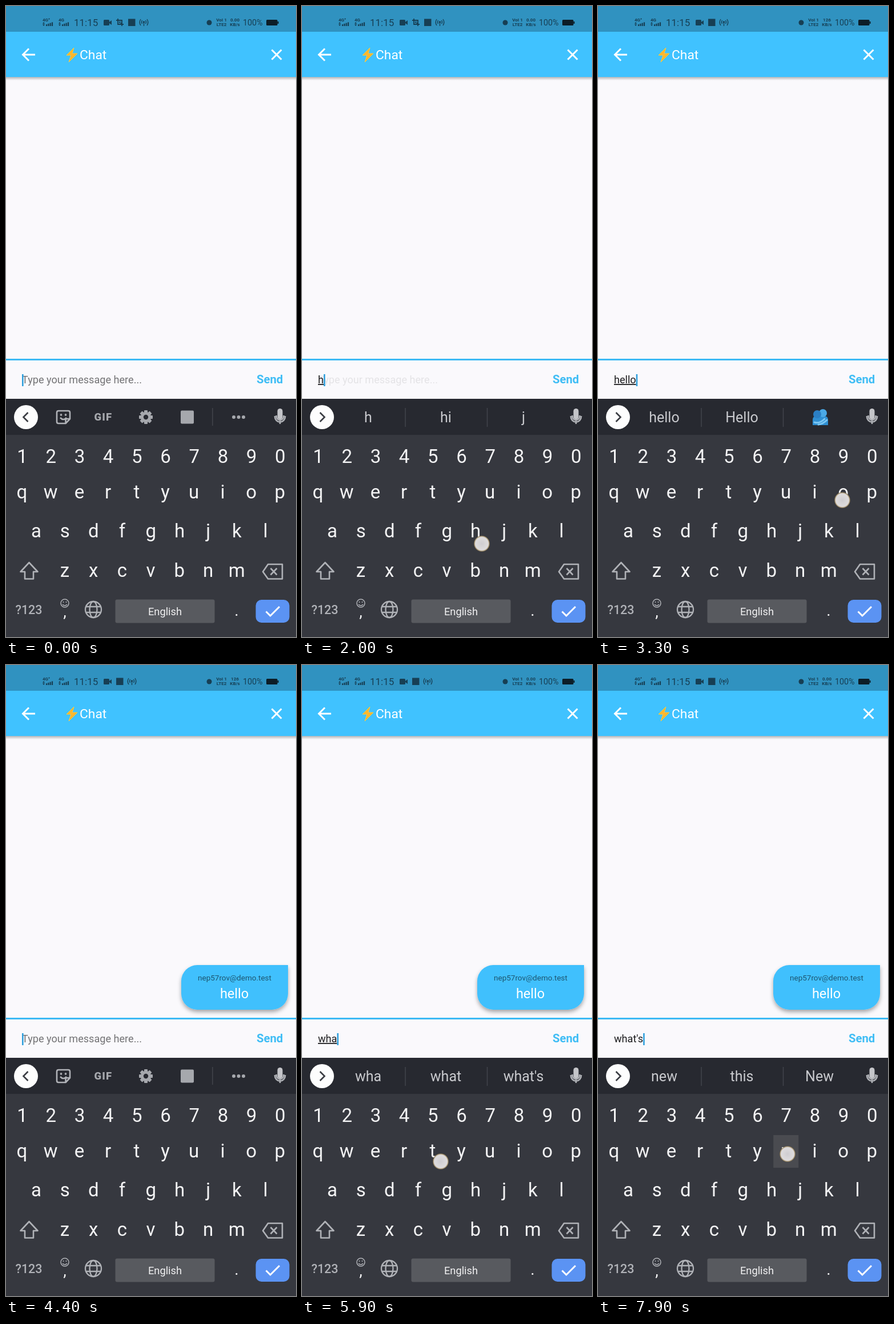
An HTML page that plays this animation: 508 by 1102 pixels, repeating every 8 s.

```html
<!DOCTYPE html>
<html lang="en">
<head>
<meta charset="utf-8">
<title>Chat</title>
<style>
html, body { margin: 0; width: 100%; height: 100%; overflow: hidden; background: #faf9fc; }
svg { display: block; }
text { font-family: Roboto, sans-serif; white-space: pre; }
.mid { text-anchor: middle; }
.key { font-size: 33px; fill: #f4f4f5; }
.chip { font-size: 25px; fill: #c9cace; }
.line { fill: none; stroke: #b0b2b7; stroke-width: 2.6; stroke-linejoin: round; }
.white { fill: none; stroke: #fff; stroke-width: 3; }
.tiny { font-size: 8px; font-weight: 700; }
</style>
</head>
<body>
<svg id="stage" width="508" height="1102" viewBox="0 0 508 1102">
  <defs>
    <filter id="soft" x="-20%" y="-30%" width="140%" height="170%">
      <feDropShadow dx="0" dy="4" stdDeviation="3.5" flood-opacity=".34"/>
    </filter>
    <linearGradient id="shade" x2="0" y2="1">
      <stop stop-color="#000" stop-opacity=".27"/>
      <stop offset="1" stop-color="#000" stop-opacity="0"/>
    </linearGradient>
    <radialGradient id="touchFill">
      <stop stop-color="#cfcdd0"/>
      <stop offset=".78" stop-color="#dedcdd"/>
      <stop offset=".9" stop-color="#a8946f"/>
      <stop offset="1" stop-color="#5b5038" stop-opacity="0"/>
    </radialGradient>
    <clipPath id="sendBox"><rect x="418" y="628" width="90" height="50"/></clipPath>
  </defs>

  <rect width="508" height="690" fill="#faf9fc"/>
  <rect y="124" width="508" height="6" fill="url(#shade)"/>
  <rect width="508" height="45" fill="#3092c0"/>
  <rect y="45" width="508" height="79" fill="#40c2ff"/>

  <!-- status bar -->
  <g fill="#173f54">
    <text class="tiny" x="64" y="27" font-size="9">4G⁺</text>
    <text class="tiny" x="92" y="27" font-size="9">4G</text>
    <g id="signals"></g>
    <text x="119" y="35" font-size="17">11:15</text>
    <rect x="171" y="24" width="10" height="10" rx="1.5"/>
    <path d="M181 28l4-3v8l-4-3z"/>
    <g id="crop" fill="none" stroke="#173f54" stroke-width="1.8">
      <path d="M196 22v10h10M193 25h10v10"/>
      <path d="M201.500 27.500h-3v2h3v2h-3" stroke-width="1.1"/>
    </g>
    <g id="shift">
      <rect x="214" y="22.500" width="12.500" height="12.500"/>
      <circle cx="241.500" cy="28" r="1.7"/>
      <path d="M241.500 29v6M238.500 25q-2 3 0 6M244.500 25q2 3 0 6M236 23q-3.500 5.500 0 11M247 23q3.500 5.500 0 11" fill="none" stroke="#173f54" stroke-width="1.3"/>
    </g>
    <circle cx="356" cy="29" r="4.500"/>
    <text class="tiny mid" x="377.500" y="27">VoI 1</text>
    <text class="tiny mid" x="377.500" y="35">LTE2</text>
    <text class="tiny mid" id="speed" x="401" y="27"></text>
    <text class="tiny mid" x="401" y="35" font-size="7">KB/s</text>
    <text x="415" y="34" font-size="14.300">100%</text>
    <rect x="456" y="24" width="19.500" height="10" rx="1.500" fill="#0c1d27"/>
    <rect x="475.500" y="27" width="2" height="4" fill="#0c1d27"/>
  </g>

  <!-- app bar -->
  <path class="white" d="M51 85H30M40 74.500L29.500 85L40 95.500"/>
  <path class="white" d="M465.500 76.500l17 17M482.500 76.500l-17 17"/>
  <path d="M119 73L106 86h8l-4 12 15-15h-9z" fill="#ffb62e" stroke="#ffc83a" stroke-linejoin="round"/>
  <text x="129" y="93" font-size="22.800" fill="#fff">Chat</text>

  <!-- message -->
  <g id="bubble">
    <path d="M335 524H494V574a28 28 0 0 1-28 28H335a28 28 0 0 1-28-28V552a28 28 0 0 1 28-28z" fill="#40c0fd" filter="url(#soft)"/>
    <text class="mid" x="400.500" y="551" font-size="13.500" fill="#000" fill-opacity=".56">nep57rov@demo.test</text>
    <text class="mid" x="400" y="582" font-size="23.500" fill="#fff">hello</text>
  </g>

  <!-- input row -->
  <rect y="616" width="508" height="3" fill="#3cbaf4"/>
  <g clip-path="url(#sendBox)"><rect id="ripple" x="418" y="628" width="90" height="50" rx="3" fill="#666"/></g>
  <text id="hint" x="28" y="659" font-size="18.100" fill="#737375">Type your message here...</text>
  <text id="typed" x="28" y="659" font-size="18.100" fill="#1c1c1e"></text>
  <rect id="caret" y="643" width="2.600" height="21" fill="#2f9fdc"/>
  <text x="439" y="659" font-size="20.300" font-weight="700" fill="#3fbdf5">Send</text>

  <!-- keyboard -->
  <rect y="686" width="508" height="416" fill="#36383f"/>
  <rect y="686" width="508" height="63" fill="#272930"/>
  <circle cx="35" cy="718" r="21" fill="#fdfdfd"/>
  <path id="chevron" fill="none" stroke="#3a3c42" stroke-width="2.600"/>
  <g fill="#aeb0b5">
    <path d="M473.500 716v1.500a6.500 6.500 0 0 0 13 0V716M480 724v7" class="line" transform="translate(0 -1)"/>
    <path d="M471 716v1.500a9 9 0 0 0 18 0V716" class="line" stroke-width="2"/>
    <rect x="475.500" y="703" width="9" height="19" rx="4.500" fill="#c4c5c9"/>
  </g>
  <g id="tools" fill="#a6a8ad">
    <path class="line" d="M92 707h17q3 0 3 3v11l-7.500 8H92q-3 0-3-3V710q0-3 3-3zM112 721h-5q-2.500 0-2.500 2.500V729"/>
    <circle cx="96.500" cy="714" r="1.900"/><circle cx="104.500" cy="714" r="1.900"/>
    <path class="line" d="M95 719q5.500 6 11 0" stroke-width="2"/>
    <text x="154.500" y="724" font-size="18.500" font-weight="900" letter-spacing="1.200">GIF</text>
    <g id="gear"></g>
    <rect x="306" y="706.500" width="23" height="23" rx="2"/>
    <rect x="361" y="702" width="1.500" height="31" fill="#42444b"/>
    <circle cx="399" cy="718" r="3"/><circle cx="407.500" cy="718" r="3"/><circle cx="416" cy="718" r="3"/>
  </g>
  <g id="chips">
    <path d="M181 702v33M324.500 702v33" stroke="#42444b" stroke-width="1.500"/>
    <text class="chip mid" x="116" y="727"></text>
    <text class="chip mid" x="252" y="727"></text>
    <text class="chip mid" x="388" y="727"></text>
    <g id="hug">
      <path d="M376 732v-9q0-7 7-7h13q7 0 7 7v9z" fill="#2f8fd2"/>
      <circle cx="394" cy="711" r="7" fill="#4aa9e6"/>
      <circle cx="384" cy="713" r="7" fill="#2b7fc4"/>
      <path d="M379 727q9 3 18-6M386 731q8-1 15-8" fill="none" stroke="#7cc7f3" stroke-width="3" stroke-linecap="round"/>
    </g>
  </g>
  <rect id="press" width="44" height="57" fill="#4a4b50"/>
  <g id="keys"></g>

  <path class="line" d="M40.500 972L25.500 988H33V1000.500H48V988H55.500z"/>
  <path class="line" d="M459 975H484V1000.500H459L450 988zM463.500 982l11 11.500M474.500 982l-11 11.500"/>
  <text class="mid" x="40" y="1062" font-size="21.500" font-weight="500" fill="#b0b2b7">?123</text>
  <g class="line" style="stroke-width:1.500">
    <circle cx="103" cy="1043" r="7"/>
    <path d="M99 1045q4 4.500 8 0M100.500 1040v2M105.500 1040v2"/>
  </g>
  <text class="key mid" x="103" y="1067" style="font-size:28px">,</text>
  <g class="line" style="stroke-width:2.300">
    <circle cx="153" cy="1054" r="14"/>
    <ellipse cx="153" cy="1054" rx="6.500" ry="14"/>
    <path d="M140 1049h26M140 1059h26"/>
  </g>
  <rect x="191.500" y="1036.500" width="174" height="41" rx="3" fill="#585a5f"/>
  <text class="mid" x="278.500" y="1064" font-size="18.300" fill="#f1f1f2">English</text>
  <text class="key mid" x="404" y="1065" style="font-size:28px">.</text>
  <rect x="437.500" y="1037" width="59" height="40" rx="10" fill="#5b93f3"/>
  <path class="white" d="M455.500 1057.500l7.500 7.500 16-16"/>
  <circle id="touch" r="14.500" fill="url(#touchFill)"/>
</svg>
<script>
const LOOP = 8000, STEP = 50.2;
const $ = id => document.getElementById(id);
const svgNS = 'http://www.w3.org/2000/svg';

function add(parent, tag, attrs, content) {
  const el = document.createElementNS(svgNS, tag);
  for (const k in attrs) el.setAttribute(k, attrs[k]);
  if (content) el.textContent = content;
  return parent.appendChild(el);
}

// rows: characters, first centre, baseline
const rows = [
  ['1234567890', 28.5, 798],
  ['qwertyuiop', 28, 860],
  ['asdfghjkl', 53, 928],
  ['zxcvbnm', 103, 997]
];
const keyAt = {};
for (const [chars, x0, y] of rows) {
  [...chars].forEach((c, i) => {
    const x = x0 + i * STEP;
    keyAt[c] = [x, y];
    add($('keys'), 'text', { class: 'key mid', x, y }, c);
  });
}

for (const x of [64, 92]) {
  add($('signals'), 'path', { d: `M${x} 31l2-3 2 3zM${x} 32l2 3 2-3z` });
  for (let i = 0; i < 4; i++) {
    const h = 3 + i * 1.2;
    add($('signals'), 'rect', { x: x + 6 + i * 3.3, y: 35 - h, width: 2.2, height: h });
  }
}

for (let i = 0; i < 8; i++) {
  add($('gear'), 'rect', {
    x: 242, y: 706, width: 6, height: 6, rx: 1, transform: `rotate(${i * 45} 245 718)`
  });
}
add($('gear'), 'circle', {
  cx: 245, cy: 718, r: 6.7, fill: 'none', stroke: '#a6a8ad', 'stroke-width': 5
});

// time, text, suggestions, underlined
const edits = [
  [0, ''],
  [1900, 'h', 'h hi j', 1],
  [2300, 'he', 'he hey hello', 1],
  [2600, 'hel', 'hel hello help', 1],
  [2800, 'hell', 'hell hello Hell', 1],
  [3300, 'hello', 'hello Hello', 1],
  [4000, ''],
  [4800, 'w', 'w what we', 1],
  [5300, 'wh', 'wh what why', 1],
  [5600, 'wha', "wha what what's", 1],
  [6000, 'what', "what what's whats", 1],
  [6900, "what's", 'new this New', 0]
];

// start, end, x, y, key held for the first moment
const touches = [
  [1800, 2100, 315, 939, 'h'],
  [2200, 2400, 134, 866, 'e'],
  [2500, 2650, 462, 935, 'l'],
  [2700, 2900, 462, 935, 'l'],
  [3200, 3400, 428, 863, 'o'],
  [3800, 4000, 470, 662],
  [4700, 4900, 86, 866, 'w'],
  [5200, 5400, 313, 938, 'h'],
  [5500, 5700, 62, 936, 'a'],
  [5800, 6100, 243, 867, 't'],
  [6800, 7000, 281, 728],
  [7900, 8000, 332, 854, 'u']
];
const keyTimes = [-100, ...edits.filter(e => e[1]).map(e => e[0])];

const show = (el, on) => { el.style.display = on ? '' : 'none'; };
const ramp = (t, from, ms) => Math.min(1, Math.max(0, (t - from) / ms));
const ease = p => 1 - (1 - p) * (1 - p);
const chipText = document.querySelectorAll('.chip');
let shown = null;

function setEdit(edit) {
  if (edit === shown) return;
  shown = edit;
  const [, text, words, underlined] = edit;
  $('typed').textContent = text;
  $('typed').style.textDecoration = underlined ? 'underline' : 'none';
  $('caret').setAttribute('x', 28 + (text ? $('typed').getComputedTextLength() : 0));
  show($('tools'), !words);
  show($('chips'), words);
  const list = (words || '').split(' ');
  chipText.forEach((el, i) => { el.textContent = list[i] || ''; });
  show($('hug'), list.length === 2);
  $('chevron').setAttribute('d', words ? 'M31.5 710l8 8-8 8' : 'M38.5 710l-8 8 8 8');
}

function draw(t) {
  setEdit(edits.filter(e => e[0] <= t).pop());

  const lastKey = keyTimes.filter(k => k <= t).pop();
  show($('caret'), Math.floor((t - lastKey) / 500) % 2 === 0);

  const out = ease(ramp(t, 1880, 200)), back = ease(ramp(t, 4000, 200));
  $('hint').style.opacity = t < 4000 ? 1 - out : t < 4800 ? back : 1 - ease(ramp(t, 4800, 200));

  show($('bubble'), t >= 4000);
  $('ripple').style.opacity = 0.14 * ramp(t, 3800, 150) * (1 - ramp(t, 4050, 330));

  const touch = touches.find(p => t >= p[0] && t < p[1]);
  show($('touch'), touch);
  const held = touch && touch[4] && t < touch[0] + 100;
  show($('press'), held);
  if (touch) {
    $('touch').setAttribute('cx', touch[2]);
    $('touch').setAttribute('cy', touch[3]);
  }
  if (held) {
    const [x, y] = keyAt[touch[4]];
    $('press').setAttribute('x', x - 22);
    $('press').setAttribute('y', y - 39);
  }

  const moved = t >= 2700;
  show($('crop'), !moved);
  $('shift').setAttribute('transform', `translate(${moved ? -21 : 0})`);
  $('speed').textContent = t >= 2700 && t < 5700 ? '126' : '0.00';
}

const start = performance.now();
function tick() {
  draw((performance.now() - start) % LOOP);
  requestAnimationFrame(tick);
}
tick();
</script>
</body>
</html>
```
